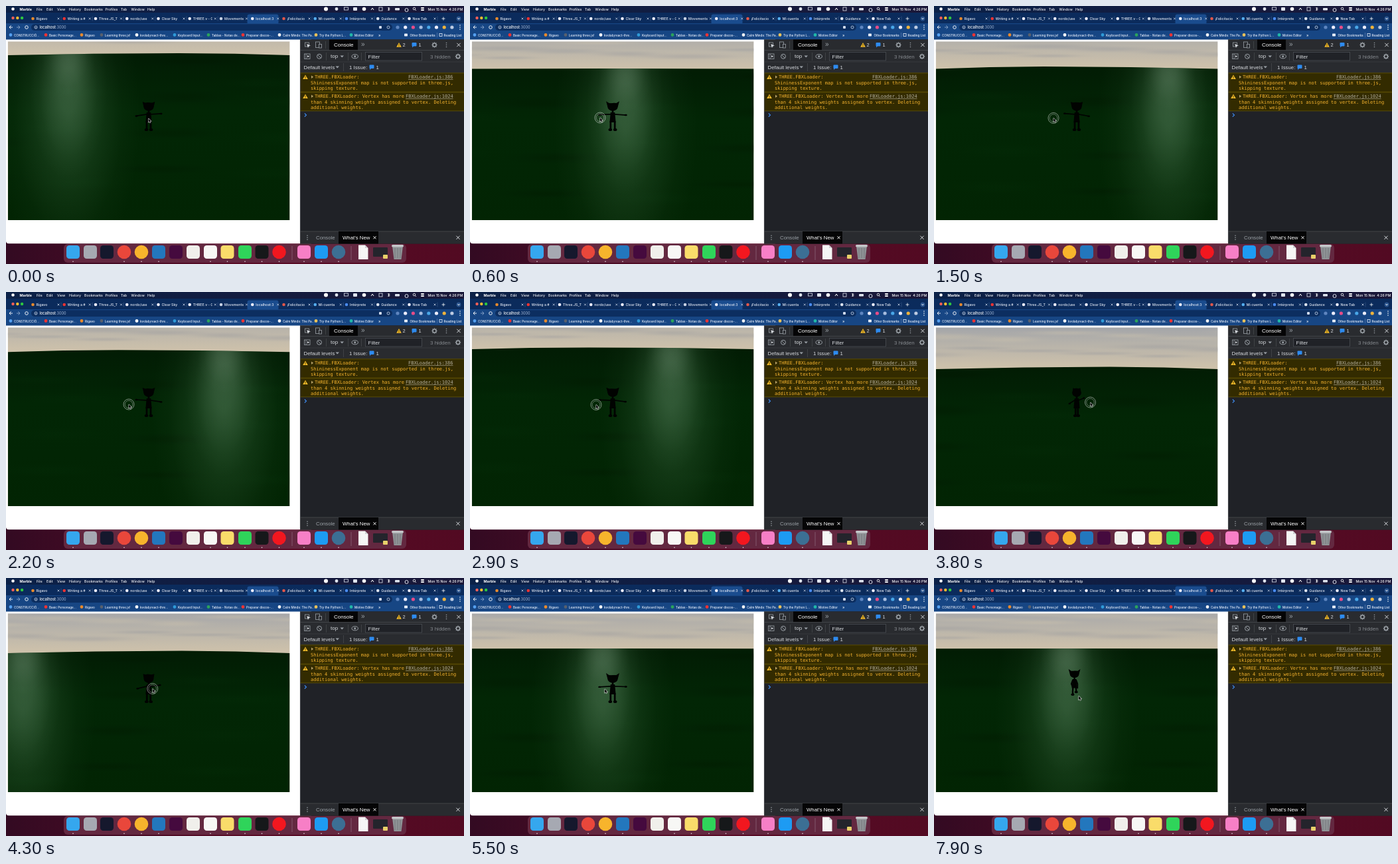
An HTML page with a canvas that plays this animation: 690 by 388 pixels, repeating every 8 s.

```html
<!DOCTYPE html>
<html lang="en">
<head>
<meta charset="utf-8">
<style>
html, body { margin: 0; width: 100%; height: 100%; overflow: hidden; background: #fff; }
canvas { display: block; width: 690px; height: 388px; }
</style>
</head>
<body>
<canvas id="stage" width="690" height="388"></canvas>
<script>
const W = 690, H = 388, LOOP = 8000;
const SANS = 'Inter, "Liberation Sans", sans-serif';
const ARIAL = '"Liberation Sans", Arial, sans-serif';
const MONO = '"DejaVu Sans Mono", monospace';
const VIEW = { x: 2.7, y: 53.3, w: 424.9, h: 268.7 };
const stage = document.getElementById('stage').getContext('2d');
const desktop = document.createElement('canvas');
desktop.width = W;
desktop.height = H;
let g = desktop.getContext('2d');

function rect(x, y, w, h, color, r = 0) {
  g.fillStyle = color;
  g.beginPath();
  g.roundRect(x, y, w, h, r);
  g.fill();
}

function dot(x, y, r, color) {
  g.fillStyle = color;
  g.beginPath();
  g.arc(x, y, r, 0, 7);
  g.fill();
}

function ellipse(x, y, rx, ry, color) {
  g.fillStyle = color;
  g.beginPath();
  g.ellipse(x, y, rx, ry, 0, 0, 7);
  g.fill();
}

function ring(x, y, r, color, width = 1) {
  g.strokeStyle = color;
  g.lineWidth = width;
  g.beginPath();
  g.arc(x, y, r, 0, 7);
  g.stroke();
}

function line(color, width, ...p) {
  g.strokeStyle = color;
  g.lineWidth = width;
  g.beginPath();
  for (let i = 0; i < p.length; i += 2) g.lineTo(p[i], p[i + 1]);
  g.stroke();
}

function poly(color, ...p) {
  g.fillStyle = color;
  g.beginPath();
  for (let i = 0; i < p.length; i += 2) g.lineTo(p[i], p[i + 1]);
  g.closePath();
  g.fill();
}

function frame(x, y, w, h, color) {
  g.strokeStyle = color;
  g.lineWidth = 0.8;
  g.strokeRect(x, y, w, h);
}

function text(str, x, y, size, color, family = SANS, weight = 400) {
  g.font = `${weight} ${size}px ${family}`;
  g.fillStyle = color;
  g.fillText(str, x, y);
}

function cross(x, y, r, color, width = 0.8) {
  line(color, width, x - r, y - r, x + r, y + r);
  line(color, width, x + r, y - r, x - r, y + r);
}

function gear(x, y, color) {
  ring(x, y, 2.6, color, 1.5);
  for (let a = 0; a < 6.2; a += Math.PI / 4)
    line(color, 1.2, x + 3 * Math.cos(a), y + 3 * Math.sin(a), x + 4.2 * Math.cos(a), y + 4.2 * Math.sin(a));
}

function kebab(x, y, color) {
  for (const d of [-3, 0, 3]) dot(x, y + d, 0.8, color);
}

function warning(x, y) {
  poly('#f5bd2a', x, y - 3.4, x + 3.8, y + 3.2, x - 3.8, y + 3.2);
  line('#3a2c00', 0.9, x, y - 1.2, x, y + 1.2);
  rect(x - 0.5, y + 1.8, 1, 0.8, '#3a2c00');
}

function bubble(x, y) {
  rect(x - 3.5, y - 3.5, 7, 5.5, '#2e8bf0', 1);
  poly('#2e8bf0', x - 3, y + 1, x, y + 1, x - 3, y + 4);
}

function menuBar() {
  const shade = g.createLinearGradient(0, 0, W, 0);
  shade.addColorStop(0, '#0b2148');
  shade.addColorStop(1, '#1a1738');
  rect(0, 0, W, 10, shade);
  dot(10.5, 4.5, 2.3, '#fff');
  text('Marble', 20.5, 6.6, 5.4, '#fff', SANS, 700);
  const items = { File: 46, Edit: 61, View: 77, History: 95, Bookmarks: 118, Profiles: 149.5, Tab: 173, Window: 188.5, Help: 213 };
  for (const name in items) text(name, items[name], 6.6, 5.2, '#f2f4f8', SANS, 500);
  dot(482, 4.5, 3, '#fff');
  dot(498, 4.5, 2.4, '#dfe4ee');
  frame(509.5, 2, 6, 4, '#dfe4ee');
  rect(523, 2, 6, 5, '#dfe4ee', 1);
  dot(539.5, 4.5, 2.8, '#fff');
  line('#fff', 1, 550, 6, 552, 3, 554, 6);
  frame(562, 2, 5, 5, '#dfe4ee');
  line('#fff', 0.8, 575, 2.5, 578, 5.5, 576.5, 7, 576.5, 2, 578, 3.5, 575, 6.5);
  rect(586, 3, 7, 3.5, '#dfe4ee', 1);
  ring(603.5, 6, 2.5, '#dfe4ee', 1);
  ring(615, 4, 1.8, '#fff', 0.8);
  line('#fff', 0.8, 616.3, 5.3, 618, 7);
  rect(625, 2, 5, 2, '#fff', 1);
  rect(625, 5, 5, 2, '#fff', 1);
  text('Mon 15 Nov  4:26 PM', 635.5, 6.6, 5.2, '#fff', SANS, 500);
}

function tabs() {
  rect(0, 10, W, 17, '#0b2b5c');
  ['#f45f57', '#f8bc30', '#2dc840'].forEach((c, i) => dot(10.5 + 6.8 * i, 18, 2.2, c));
  const list = [
    ['Rigavo', '#e88a2c'], ['Writing a #', '#e33'], ['Three.JS_T', '#eef'], ['nordo/use', '#eef'],
    ['Clear Sky', '#eef'], ['THREE.v - G', '#eef'], ['Movements', '#c8d2e4'], ['localhost:3', '#eef'],
    ['¡Felicitacio', '#e2574a'], ['Mi cuenta', '#55aef0'], ['Intérprete', '#4a8bf0'], ['Guidance', '#dce3ef'], ['New Tab', '#eef']
  ];
  rect(363.5, 12.5, 47, 15, '#1a4c8e', 3);
  list.forEach(([name, color], i) => {
    const x = 40.5 + 47.25 * i;
    dot(x, 19, 2.3, color);
    g.save();
    g.beginPath();
    g.rect(x + 4, 12, 30, 14);
    g.clip();
    text(name, x + 5, 21.1, 5.2, '#e9eef8', SANS, 500);
    g.restore();
    cross(x + 38.5, 19, 1.4, '#dbe4f4', 0.7);
    if (i !== 6 && i !== 7) line('#42618f', 0.6, x + 42.5, 15.5, x + 42.5, 22.5);
  });
  line('#fff', 0.8, 656.5, 19, 661.5, 19);
  line('#fff', 0.8, 659, 16.5, 659, 21.5);
  dot(682, 19, 3.4, '#2d568f');
  line('#fff', 0.8, 680.5, 18, 682, 20, 683.5, 18);
}

function toolbar() {
  rect(0, 26, W, 24.5, '#174684');
  line('#fff', 0.9, 10, 32, 5, 32, 7.4, 29.6, 5, 32, 7.4, 34.4);
  line('#8da6cb', 0.9, 16, 32, 21, 32, 18.6, 29.6, 21, 32, 18.6, 34.4);
  ring(31, 32, 2.3, '#fff', 0.9);
  rect(38, 27.3, 544, 9.6, '#0c2e60', 4.8);
  ring(45, 32, 2.1, '#e7eefb', 0.7);
  line('#e7eefb', 0.7, 45, 31.5, 45, 33.3);
  text('localhost', 50.5, 34.1, 5.6, '#fff', SANS, 500);
  const hostEnd = 50.5 + g.measureText('localhost').width;
  text(':3000', hostEnd, 34.1, 5.6, '#9fb4d4');
  rect(562, 30, 4, 4, '#cfdaed', 1);
  ring(576, 32, 2, '#cfdaed', 0.8);
  ['#5f86c0', '#eef', '#e84c88', '#a7bde0', '#49a7e8', '#eef', '#f0b43c', '#bfcce2']
    .forEach((c, i) => dot(590 + 11.7 * i, 32, 2.6, c));
  kebab(684, 32, '#fff');

  const marks = [
    [7, 'CONSTRUCCIÓ...', '#55a0f0'], [60, 'Basic Personage...', '#e33'], [114, 'Rigavo', '#e88a2c'],
    [144, 'Learning three.js!', '#58606e'], [197, 'kvolab/react-thre...', '#fff'], [254, 'Keyboard Input...', '#2f9bd8'],
    [305, 'Tablas - Notas de...', '#2ba35c'], [357, 'Preparar discos-...', '#e33'], [412, 'Calm Minds: The Pa...', '#f4f4f4'],
    [467, 'Try the Python L...', '#e9c25a'], [520, 'Motive Editor', '#20b8a8']
  ];
  for (const [x, name, color] of marks) {
    dot(x, 43.5, 2.4, color);
    text(name, x + 5, 45.5, 4.6, '#f0f5ff', SANS, 500);
  }
  text('»', 561, 45.5, 6, '#fff');
  rect(600, 41.5, 5, 4, '#e8eefa', 0.8);
  text('Other Bookmarks', 608.5, 45.5, 4.6, '#f0f5ff', SANS, 500);
  line('#6d8dbd', 0.6, 649.5, 40, 649.5, 47);
  frame(653, 41.5, 4, 4, '#e8eefa');
  text('Reading List', 659.5, 45.5, 4.6, '#f0f5ff', SANS, 500);
}

function message(y, h, link, linkX, lines) {
  rect(443, y, 247, h, '#332b00');
  line('#665500', 0.8, 443, y, W, y);
  line('#665500', 0.8, 443, y + h, W, y + h);
  warning(451, y + 6);
  poly('#b9a36a', 460, y + 3.8, 463, y + 6, 460, y + 8.2);
  lines.forEach((s, i) => text(s, i ? 459 : 465, y + 8.4 + 8.4 * i, 7, '#f5b32e', MONO));
  text(link, linkX, y + 8.4, 7, '#b5b0a0', MONO);
  line('#b5b0a0', 0.6, linkX, y + 9.7, 673.5, y + 9.7);
}

function devtools() {
  const gray = '#9aa0a6', pale = '#d5d8dc', panel = '#292b2f';
  rect(443, 50.5, 247, 307, '#202227');
  rect(443, 50.5, 247, 50, panel);
  rect(487, 50.5, 43, 16, '#050506');
  frame(450.5, 55, 6, 6, gray);
  poly(pale, 453, 57, 459, 59.5, 456, 60.3, 455, 63);
  frame(466.5, 54, 6, 8.5, gray);
  rect(471, 57, 5, 6.5, panel);
  frame(471.5, 57.5, 4, 5.5, gray);
  line('#4a4c50', 0.7, 481.5, 53, 481.5, 64);
  text('Console', 494, 61.4, 8, '#fff', ARIAL);
  text('»', 535, 61, 10, gray, ARIAL);
  warning(592, 58.5);
  text('2', 597.5, 61.2, 7.5, pale, ARIAL);
  bubble(615, 58.5);
  text('1', 621.5, 61.2, 7.5, pale, ARIAL);
  gear(645.5, 58.5, gray);
  kebab(663.5, 58.5, gray);
  cross(682, 58.5, 2.7, pale, 1);
  line('#494c50', 0.8, 443, 66.5, W, 66.5);

  frame(449.5, 72, 8.5, 7.5, gray);
  line(gray, 0.8, 452, 72, 452, 79.5);
  poly(pale, 454, 74, 457, 75.8, 454, 77.6);
  ring(472, 75.8, 3.5, gray, 1);
  line(gray, 1, 469.6, 73.4, 474.4, 78.2);
  line('#4a4c50', 0.7, 482.5, 70, 482.5, 82);
  text('top', 489, 78.4, 8, pale, ARIAL);
  poly(gray, 503.5, 74.5, 509, 74.5, 506.2, 77.5);
  line('#4a4c50', 0.7, 515.5, 70, 515.5, 82);
  g.strokeStyle = gray;
  g.lineWidth = 1;
  g.beginPath();
  g.ellipse(525.7, 75.8, 4.7, 3, 0, 0, 7);
  g.stroke();
  dot(525.7, 75.8, 1.5, gray);
  line('#4a4c50', 0.7, 535.5, 70, 535.5, 82);
  rect(541, 69, 86, 13.5, '#202227', 1);
  frame(541.5, 69.4, 85, 12.6, '#4d5055');
  text('Filter', 545.5, 78.6, 8, pale, ARIAL);
  text('3 hidden', 639, 78.6, 8, '#85898e', ARIAL);
  gear(681, 75.8, gray);
  line('#3c3e42', 0.8, 443, 84, W, 84);

  text('Default levels', 448.5, 94.7, 7.8, pale, ARIAL);
  poly(gray, 496.5, 90.5, 502, 90.5, 499.2, 93.5);
  line('#4a4c50', 0.7, 508.5, 86, 508.5, 98);
  text('1 Issue:', 517, 94.7, 7.8, pale, ARIAL);
  bubble(551, 92);
  text('1', 557.5, 94.7, 7.8, pale, ARIAL);

  message(100.8, 28.4, 'FBXLoader.js:386', 606, ['THREE.FBXLoader:', 'ShininessExponent map is not supported in three.js,', 'skipping texture.']);
  message(129.8, 28, 'FBXLoader.js:1024', 602, ['THREE.FBXLoader: Vertex has more', 'than 4 skinning weights assigned to vertex. Deleting', 'additional weights.']);
  line('#3f8cf0', 1.1, 449.8, 161.5, 452.5, 164, 449.8, 166.5);

  rect(443, 339, 247, 18.5, panel);
  line('#494c50', 0.8, 443, 339, W, 339);
  rect(501, 339, 60, 18.5, '#050506');
  kebab(454, 348.3, gray);
  text('Console', 467, 351, 7.8, gray, ARIAL);
  text("What's New", 507, 351, 7.8, '#fff', ARIAL);
  cross(555.5, 348.3, 2, '#fff', 1);
  cross(681, 348.3, 2.6, pale, 1);
  line('#494c50', 0.8, 443.4, 50.5, 443.4, 357);
}

function wallpaper() {
  const wall = g.createLinearGradient(0, 0, W, 0);
  wall.addColorStop(0, '#330a22');
  wall.addColorStop(0.5, '#5a0c27');
  wall.addColorStop(1, '#520a22');
  rect(0, 340, W, 48, wall);
}

function dock() {
  rect(87, 358, 516, 28, '#632840', 6);
  const square = [
    [101, '#35a7ee'], [127, '#a6a9b2'], [152, '#15182d'], [230, '#2377bd'], [256, '#450a3e'], [282, '#f0efeb'],
    [308, '#f7f7f5'], [333.5, '#f9dc6a'], [360, '#2fd45a'], [385.5, '#16181a'], [449, '#f77fc6'], [475, '#1d9bf3']
  ];
  for (const [x, c] of square) rect(x - 10, 360, 20, 20, c, 4.5);
  for (const [x, c] of [[178, '#e9473b'], [204, '#f7b42c'], [411.5, '#f2171f'], [501, '#3c6f94']]) dot(x, 370, 10.3, c);
  for (const x of [431, 520]) line('#8c6279', 0.8, x, 361, x, 382);
  poly('#f5f5f5', 531, 359.5, 541, 359.5, 545.5, 364, 545.5, 381, 531, 381);
  poly('#cfcfd3', 541, 359.5, 545.5, 364, 541, 364);
  rect(553, 363, 22, 14, '#24242c', 1);
  rect(568, 374, 7, 6, '#e8d06a', 1);
  poly('#8f9396', 582, 361, 598, 361, 595.5, 381, 584.5, 381);
  rect(581, 359, 18, 3.5, '#c4c7c9', 1.7);
  for (const x of [586, 590, 594]) line('#6a6f73', 0.7, x, 364, x, 379);
  for (const x of [101, 178, 204, 230, 308, 333.5, 360, 385.5, 411.5, 449, 475, 501]) dot(x, 384.3, 0.8, '#e8dce4');
}

function paintDesktop() {
  wallpaper();
  rect(0, 50, 460, 307.3, '#fff', [0, 0, 0, 4]);
  menuBar();
  tabs();
  toolbar();
  devtools();
  dock();
}

// Each row: time, then values interpolated linearly.
function track(rows, t) {
  const i = rows.findIndex(r => r[0] > t);
  if (i < 0) return rows[rows.length - 1].slice(1);
  if (i === 0) return rows[0].slice(1);
  const a = rows[i - 1], b = rows[i], k = (t - a[0]) / (b[0] - a[0]);
  return a.slice(1).map((v, j) => v + (b[j + 1] - v) * k);
}

// light x, horizon y
const CAMERA = [[0, 94, 71], [600, 234, 94], [1500, 354, 91], [2900, 303, 83.5], [3800, -120, 112.5], [4900, 200, 106]];
const POINTER = [
  [0, 214.5, 169], [600, 196, 168], [1500, 180, 168.5], [2900, 190, 169.5], [3800, 235.5, 166],
  [4900, 203, 167], [6400, 203, 167], [7300, 218, 189], [7900, 218, 177.5]
];

function blob(x, y, rx, ry, rgb, alpha) {
  g.save();
  g.translate(x, y);
  g.scale(rx, ry);
  const glow = g.createRadialGradient(0, 0, 0, 0, 0, 1);
  for (const s of [0, 0.25, 0.5, 0.75, 1])
    glow.addColorStop(s, `rgba(${rgb},${alpha * Math.cos(s * Math.PI / 2) ** 2})`);
  g.fillStyle = glow;
  g.fillRect(-1, -1, 2, 2);
  g.restore();
}

function sky(lightX, horizon) {
  const fade = g.createLinearGradient(0, horizon - 62, 0, horizon);
  fade.addColorStop(0, '#a2a4a9');
  fade.addColorStop(0.5, '#b9b4aa');
  fade.addColorStop(1, '#cdc1ab');
  rect(VIEW.x, VIEW.y, VIEW.w, VIEW.h, fade);
  for (let i = 0; i < 16; i++) {
    const x = (i * 137 + lightX + 1200) % 640 - 100;
    blob(x, horizon - 16 - (i * 23) % 44, 70 + (i * 17) % 50, 4 + i % 4, i % 2 ? '212,200,174' : '146,148,155', 0.32);
  }
}

// The far corner of the plane makes the horizon fall off to both sides when turned.
function ground(lightX, horizon, yaw) {
  const right = VIEW.x + VIEW.w, bottom = VIEW.y + VIEW.h;
  const fall = Math.min(1, Math.abs(yaw) / 0.4) * 3.5;
  const peak = 215 - Math.max(-50, Math.min(50, yaw * 130));
  g.beginPath();
  g.moveTo(VIEW.x, horizon + fall);
  g.quadraticCurveTo((VIEW.x + peak) / 2, horizon, peak, horizon);
  g.quadraticCurveTo((right + peak) / 2, horizon, right, horizon + fall);
  g.lineTo(right, bottom);
  g.lineTo(VIEW.x, bottom);
  g.closePath();
  g.clip();
  const grass = g.createLinearGradient(0, horizon, 0, bottom);
  grass.addColorStop(0, '#021c04');
  grass.addColorStop(0.35, '#022605');
  grass.addColorStop(1, '#022403');
  rect(VIEW.x, VIEW.y, VIEW.w, VIEW.h, grass);
  for (let i = 0; i < 14; i++) {
    const x = (i * 151 + lightX * 1.2 + 1500) % 620 - 90;
    blob(x, horizon + 12 + (i * 61) % 190, 90, 9 + i % 6, i % 2 ? '5,46,9' : '0,18,0', 0.22);
  }
  blob(lightX, horizon + 95, 108, 240, '62,108,68', 0.4);
  blob(lightX, horizon + 55, 58, 135, '108,148,114', 0.32);
  blob(lightX, horizon + 10, 40, 55, '135,165,138', 0.22);
}

function limb(width, ...p) {
  g.lineCap = g.lineJoin = 'round';
  line('#010301', width, ...p);
  g.lineCap = 'butt';
  g.lineJoin = 'miter';
}

function elf(t, yaw) {
  const black = '#010301';
  const running = t >= 6500;
  const go = running ? Math.min(1, (t - 6500) / 1400) : 0;
  const swing = running ? Math.sin((t - 7900) / 700 * Math.PI * 2 + 1.2) : 0;
  const c = Math.cos(yaw), s = Math.sin(yaw), size = 1 - 0.11 * go;
  const turn = Math.min(1, Math.abs(s) * 2.2);
  g.save();
  g.translate(215 - 3.4 * go, 188 - 11 * go);
  g.scale(size, size);
  const head = 7.6 * (0.75 + 0.25 * c), tip = -45 + 1.3 * turn;
  ellipse(0, -36, head, 5.8, black);
  poly(black, -head, -36, -10 * c, tip, -5.5 * c, -41.8 - turn, -2 * c, -41.6 - 1.8 * turn, 2 * c, -42 - turn,
    5.5 * c, -41.8 - turn, 10 * c, tip, head, -36);
  limb(2.6, 0, -31, 0, -26);
  poly(black, -3.2, -28, 3.2, -28, 4.6, -13, -4.6, -13);
  if (running) {
    limb(2.3, -3, -26, -5.2, -20, -4.2 + swing, -14 - swing);
    limb(2.3, 3, -26, 5.2, -20, 4.2 + swing, -14 + swing);
  } else {
    const reach = 20.5 * c, dip = 5 * s;
    limb(1.7, -reach, -24.3 - dip, -3, -25.2, 3, -25.2, reach, -24.3 + dip);
    limb(2.4, -reach * 0.93, -24.3 - dip, -reach, -24.3 - dip);
    limb(2.4, reach * 0.93, -24.3 + dip, reach, -24.3 + dip);
  }
  for (const side of [-1, 1]) {
    const x = side * (running ? 2.5 : 3.2 * c), lift = running ? Math.max(0, swing * side) * 4.5 : 0;
    limb(2.7, x, -14, x + (running ? side * 0.5 : 0), -6 - lift / 2, x, -2 - lift);
    ellipse(x + side * 0.5, -2 - lift, 2.8, 2.1, black);
  }
  g.restore();
}

function pointer(t) {
  const [x, y] = track(POINTER, t);
  if (t >= 100 && t < 4900) {
    ring(x, y, 8, 'rgba(225,230,225,.6)', 0.9);
    ring(x, y, 5.8, 'rgba(225,230,225,.5)', 0.8);
  }
  const arrow = [0, 0, 0, 5.6, 1.3, 4.5, 2.3, 6.6, 3.3, 6.1, 2.3, 4.1, 4, 4].map((v, i) => v + (i % 2 ? y : x));
  line('rgba(255,255,255,.75)', 1.1, ...arrow, x, y);
  poly('#111', ...arrow);
}

function draw(now) {
  const t = Math.floor(now % LOOP / 100) * 100;
  const [lightX, horizon] = track(CAMERA, t);
  const yaw = (lightX - 212) * 0.003;
  g = stage;
  g.drawImage(desktop, 0, 0);
  g.save();
  g.beginPath();
  g.rect(VIEW.x, VIEW.y, VIEW.w, VIEW.h);
  g.clip();
  sky(lightX, horizon);
  ground(lightX, horizon, yaw);
  elf(t, yaw);
  g.restore();
  pointer(t);
}

paintDesktop();
const start = performance.now();
function tick() {
  draw(performance.now() - start);
  requestAnimationFrame(tick);
}
tick();
</script>
</body>
</html>
```
